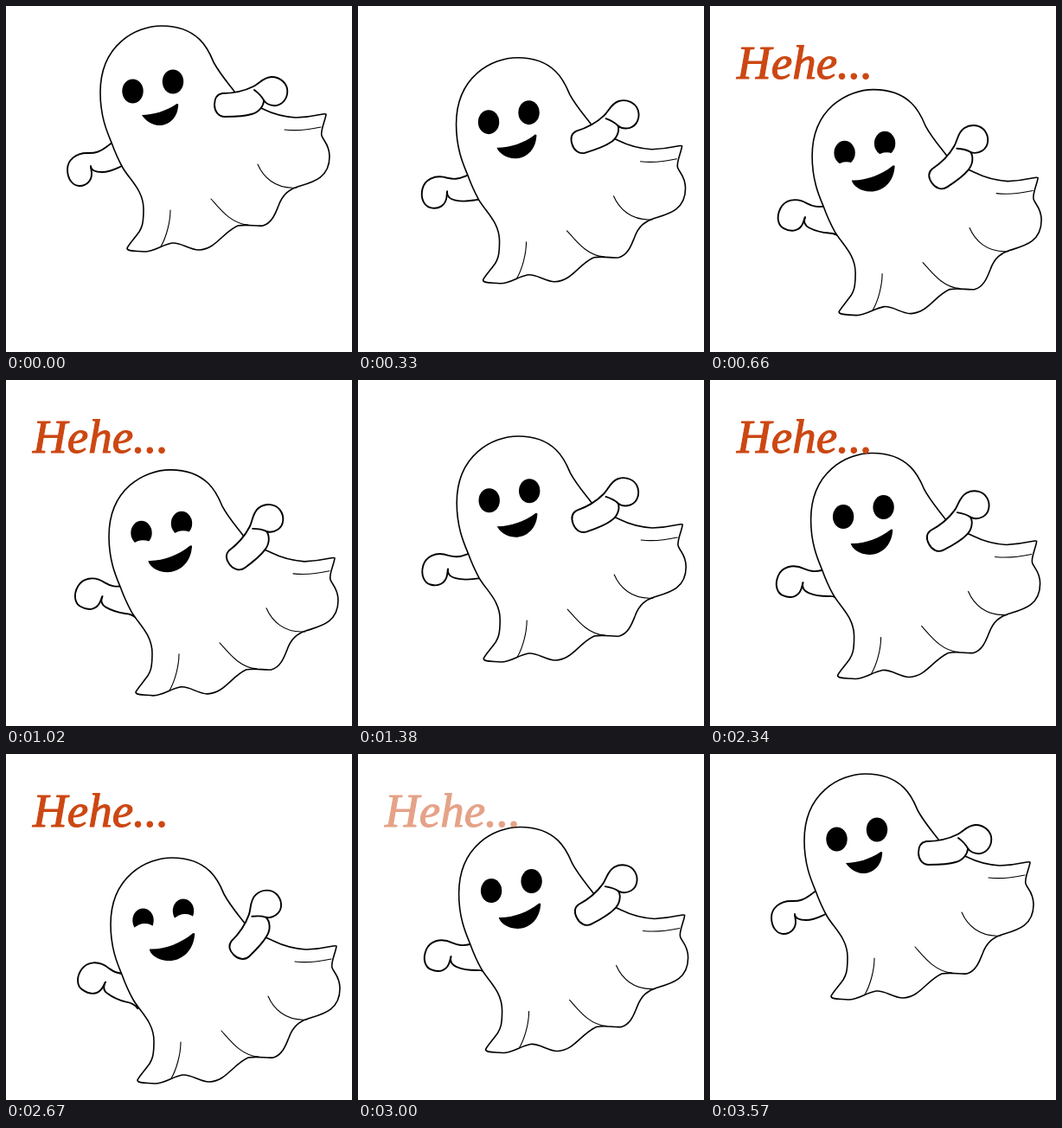
These frames come from a looping animation (400x400 px, 3600 ms). An HTML page:

```html
<!DOCTYPE html>
<html lang="en">
<head>
<meta charset="utf-8">
<title>Hehe ghost</title>
<style>
  html, body { margin: 0; width: 100%; height: 100%; overflow: hidden; background: #fff; }
  svg { display: block; width: 100vw; height: 100vh; }
  .line { fill: none; stroke: #000; stroke-width: 1.6; stroke-linecap: round; stroke-linejoin: round; }
  .skin { fill: #fff; }
  .arm { stroke-width: 1.9; }
  .fold { stroke-width: 1.1; }
  text { font: italic 55px "Liberation Serif", "Times New Roman", serif; fill: #cc4712; stroke: #cc4712; stroke-width: 1.1; }
</style>
</head>
<body>
<svg viewBox="0 0 400 400">
  <g id="ghost">
    <g id="left" class="line arm">
      <path id="hand"/>
      <path id="under"/>
    </g>
    <path class="line skin" d="M180 23C150 23 109 45 109 100C109 128 117 146 122 158C126 169 130 178 135 187C143 201 159 213 159 235C159 252 157 256 154 261C149 268 141 277 140 280C140 284 150 283 160 284C172 284 180 276 192 274C203 273 211 282 223 282C243 281 250 262 268 254C280 252 289 255 297 254C308 251 312 238 315 231C320 217 328 212 337 209C353 204 374 200 374 174C374 160 367 156 365 150C363 144 370 130 370 125C368 123 360 128 335 129C320 128 305 123 297 119C283 112 275 112 265 100C255 87 247 78 240 65C235 53 224 23 180 23Z"/>
    <path class="line fold" d="M322 143C335 144.5 350 143 364 140M291 183C297 197 311 212 336 210M237 223C247 234 260 252 280 253M190 236C190 250 185 268 179 278"/>
    <g id="eyes">
      <ellipse cx="146.5" cy="98.5" rx="12.2" ry="14"/>
      <ellipse cx="193" cy="87.5" rx="12.2" ry="14"/>
    </g>
    <g id="lids" class="skin">
      <circle cx="148.5" cy="130.5" r="18"/>
      <circle cx="195" cy="119.5" r="18"/>
    </g>
    <path id="mouth"/>
    <g id="right" class="line arm">
      <path class="skin" d="M250 101C265 101 278 97 286 93C293 89.5 298 82 307 82C317.5 82 325.3 90 325.3 98.5C325.3 108 318.5 115.2 310.5 115.2C304 115 300 112 298 109C298 116 292 123 284 125C275 128 262 128 253 128C245 128 241 121 241 114C241 107 244 102 250 101Z"/>
      <path d="M287 97C291 100 295 103 298 109"/>
    </g>
  </g>
  <g id="laugh"><text x="31" y="83.5">Hehe...</text></g>
</svg>
<script>
const LOOP = 3600, STEP = 30;
const el = id => document.getElementById(id);
const set = (id, name, value) => el(id).setAttribute(name, value);
const move = (id, value) => set(id, 'transform', value);
const clamp = v => Math.min(1, Math.max(0, v));

// Mouth outline: start point and four cubic curves, small and wide smile
const smile = [157,126, 170,126, 186,121, 196,114, 198,112, 200,113, 199,116, 198,130, 188,138, 177,138, 168,138, 160,131, 157,126];
const grin = [154,128.5, 170,129.5, 190,122, 203,111, 205,109, 207,110, 206,113, 204,132, 190,142, 177,142, 163,142, 154,134, 154,128.5];

function mouthPath(p) {
  const v = smile.map((a, i) => (a + (grin[i] - a) * p).toFixed(2));
  return `M${v.slice(0, 2)}C${v.slice(2)}Z`;
}

// The left palm widens and the arm's lower edge drops as the arm lifts
function drawLeftArm(p) {
  const w = 4 * p, d = 5 * p, y = 192 + d / 2;
  set('hand', 'd', `M140 146C128 155 122 158 116 163C108 169 103 170 96 170C80 169 71 179 71 189C71 201 78 208 85 208C${94 + w} 208 ${99 + w} 201 ${99 + w} 194C${99 + w} 190 ${98 + w} 188 ${98 + w} 185`);
  set('under', 'd', `M${98 + w} 186C${99 + w} 191 ${104 + w / 2} ${y} 111 ${y}C121 ${y} 127 ${188 + d} 134 ${185 + d}C140 ${182 + d} 145 186 150 188`);
  move('left', `rotate(${36 * p} 131 177.5)`);
}

function popScale(k) {
  if (k < 15.5) return clamp((k - 11.5) / 4);
  if (k < 17) return 1 + 0.05 * (k - 15.5) / 1.5;
  return 1 + 0.05 * clamp((19 - k) / 2);
}

function draw(ms) {
  const f = Math.floor((ms % LOOP) / STEP);
  const p = f < 29 ? f / 29 : Math.abs(1 - ((f - 29) % 60) / 30);
  const k = f % 59;

  move('ghost', `translate(${12 * p} ${97 * p})`);
  drawLeftArm(p);
  move('right', `rotate(${-44 * p} 272 112)`);
  move('eyes', `translate(0 ${-3 * p})`);
  move('lids', `translate(0 ${-3 * p - 29 * (p - 0.64)})`);
  set('mouth', 'd', mouthPath(p));

  move('laugh', `translate(106 65) scale(${popScale(k)}) translate(-106 -65)`);
  set('laugh', 'opacity', 1 - clamp((k - 37) / 8));
}

const start = performance.now();
function tick() {
  draw(performance.now() - start);
  requestAnimationFrame(tick);
}
draw(0);
requestAnimationFrame(tick);
</script>
</body>
</html>
```
